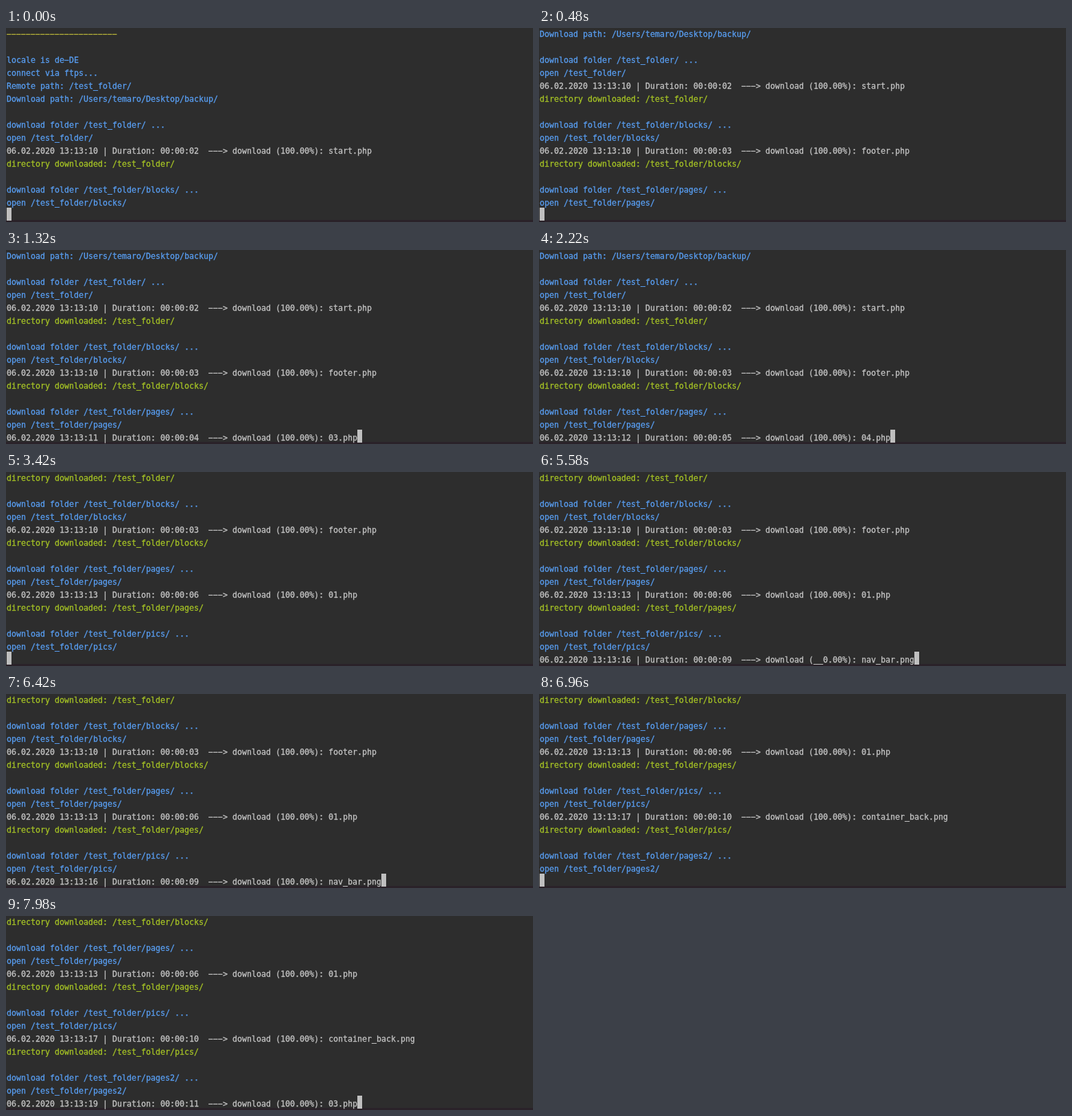
An HTML page that plays this animation: 768x284 px, repeating every 8 s.

```html
<!DOCTYPE html>
<html lang="en">
<head>
<meta charset="utf-8">
<title>Backup log</title>
<style>
  html, body { margin: 0; width: 100%; height: 100%; overflow: hidden; background: #2d2d2d; }
  svg { display: block; }
  text { font: 11.63px "DejaVu Sans Mono", monospace; white-space: pre; stroke-width: .3px; }
  .blue { fill: #589df0; stroke: #589df0; }
  .green { fill: #a5c225; stroke: #a5c225; }
  .rule { fill: #bdb83a; stroke: #bdb83a; }
  .gray { fill: #c3c3c3; stroke: #c3c3c3; }
</style>
</head>
<body>
<svg id="stage" width="768" height="284" viewBox="0 0 768 284">
  <rect width="768" height="284" fill="#2d2d2d"/>
  <rect y="281" width="768" height="3" fill="#2a2229"/>
  <rect id="cursor" width="7" height="19" fill="#bfbfbf"/>
</svg>
<script>
const LOOP = 8000, ROWS = 15, PITCH = 19, CHAR = 7;
const stage = document.getElementById('stage');
const cursor = document.getElementById('cursor');

const intro = [
  ['rule', '-'.repeat(23)],
  ['blue', ''],
  ['blue', 'locale is de-DE'],
  ['blue', 'connect via ftps...'],
  ['blue', 'Remote path: /test_folder/'],
  ['blue', 'Download path: /Users/temaro/Desktop/backup/'],
  ['blue', '']
];

// Each file: name, time it starts, time it is complete.
const folders = [
  { path: '', opened: -2000, files: [['start.php', -600, -300]] },
  { path: 'blocks/', opened: -200, files: [['footer.php', 180, 360]] },
  { path: 'pages/', opened: 480, files: [
    ['03.php', 900, 1200], ['02.php', 1440, 1680],
    ['04.php', 1920, 2160], ['01.php', 2580, 3180]] },
  { path: 'pics/', opened: 3300, files: [
    ['header_back.png', 3780, 4260], ['footer_bar.png', 4620, 5100],
    ['nav_bar.png', 5460, 6060], ['container_back.png', 6600, 6780]] },
  { path: 'pages2/', opened: 6900, files: [['03.php', 7440, 7980]] }
];

const two = n => String(n).padStart(2, '0');

function status(name, ms, percent) {
  const clock = 10.5 + 1.07 * ms / 1000;
  const share = percent.toFixed(2).padStart(6, '_');
  return `06.02.2020 13:13:${two(Math.floor(clock))} | Duration: 00:00:` +
    `${two(Math.floor(clock - 7.3))}  ---> download (${share}%): ${name}`;
}

function currentStatus(files, t) {
  const file = files.filter(f => f[1] <= t).pop();
  if (!file) return '';
  const [name, start, done] = file;
  return t >= done ? status(name, done, 100) : status(name, start, 0);
}

function logAt(t) {
  const lines = [...intro];
  folders.filter(f => f.opened <= t).forEach(({ path, files }, i, open) => {
    const full = '/test_folder/' + path;
    lines.push(['blue', `download folder ${full} ...`], ['blue', `open ${full}`],
      ['gray', currentStatus(files, t)]);
    if (i < open.length - 1) lines.push(['green', `directory downloaded: ${full}`], ['blue', '']);
  });
  return lines.slice(-ROWS);
}

const rows = Array.from({ length: ROWS }, (_, i) => {
  const row = document.createElementNS('http://www.w3.org/2000/svg', 'text');
  row.setAttribute('x', 1);
  row.setAttribute('y', 13 + i * PITCH);
  return stage.appendChild(row);
});

function draw(t) {
  const lines = logAt(t);
  lines.forEach(([color, text], i) => {
    // The minus sign gives the wide dash of the terminal face.
    const shown = text.replace(/-/g, '\u2212');
    if (rows[i].textContent !== shown) rows[i].textContent = shown;
    rows[i].setAttribute('class', color);
  });
  const last = lines.length - 1;
  cursor.setAttribute('x', 1 + CHAR * lines[last][1].length);
  cursor.setAttribute('y', last * PITCH - 3);
}

function tick() {
  draw(performance.now() % LOOP);
  requestAnimationFrame(tick);
}
tick();
</script>
</body>
</html>
```
